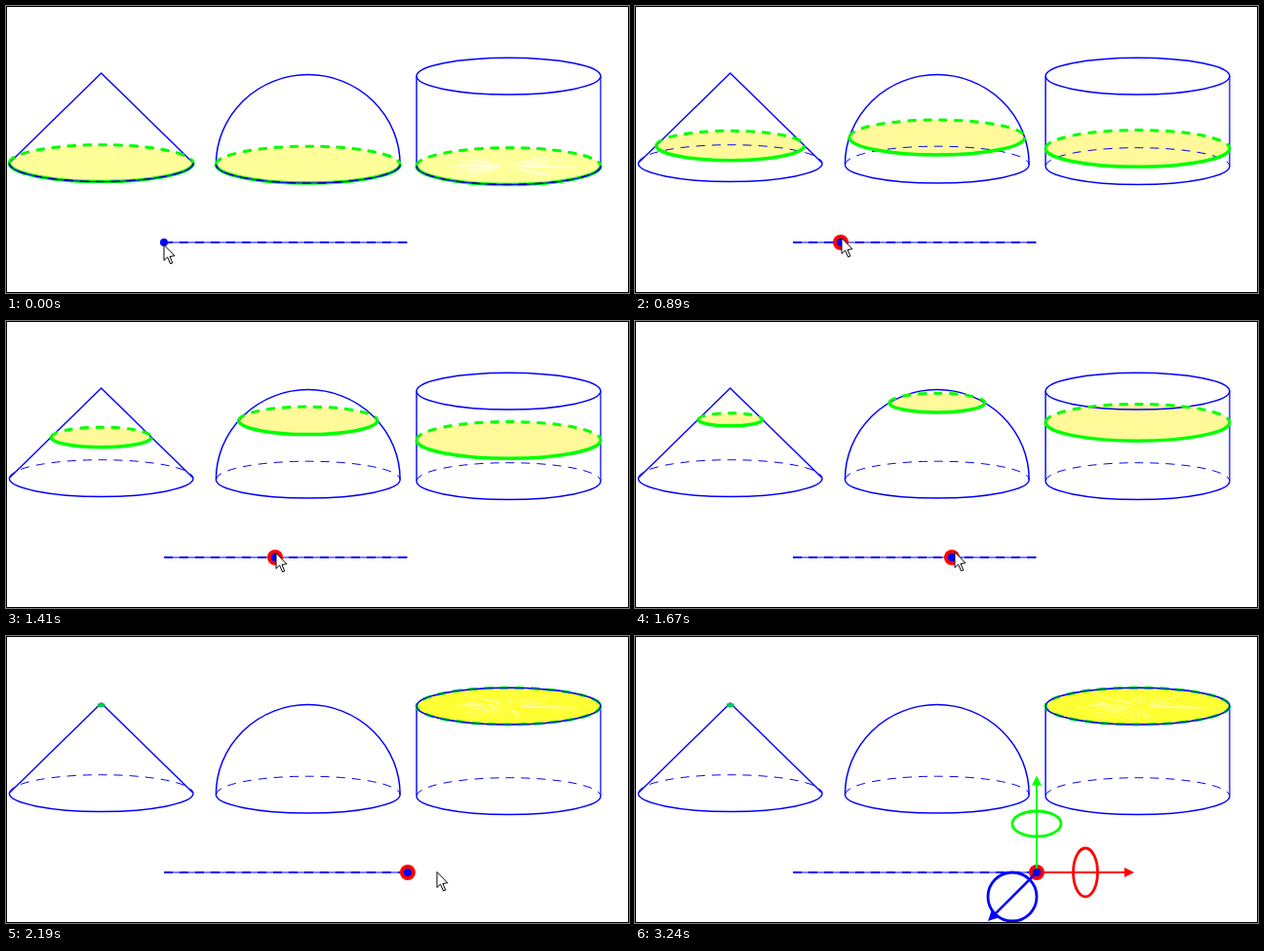
These frames come from a looping animation (639x295 px, 3500 ms). An HTML page with a canvas:

```html
<!DOCTYPE html>
<html lang="en">
<head>
<meta charset="utf-8">
<title>Sections of a cone, a hemisphere and a cylinder</title>
<style>
  html, body { margin: 0; width: 100%; height: 100%; overflow: hidden; background: #fff; }
  canvas { display: block; width: 639px; height: 295px; }
</style>
</head>
<body>
<canvas id="stage" width="639" height="295"></canvas>
<script>
const ctx = document.getElementById('stage').getContext('2d');
const LOOP = 3500, TAU = Math.PI * 2;
const BLUE = '#0000ff', GREEN = '#00ff00', RED = '#ff0000';
const RX = 94.4, RY = 18.9, HEIGHT = 92.5;
const TRACK = { from: 162, to: 412, y: 243 };
const CONE = { x: 97.7, y: 161.6 };
const DOME = { x: 309.8, y: 163.1 };
const DRUM = { x: 515.5, y: 164.6 };

// Each step: start time, knob x, pointer x and y
const STEPS = [
  [0, 162, 162, 245],
  [100, 162, 162, 244],
  [630, 174, 176, 239],
  [890, 211, 212, 238],
  [1150, 243, 244, 238],
  [1410, 276, 277, 238],
  [1670, 325, 328, 237],
  [1930, 386, 388, 238],
  [2190, 412, 442, 242],
  [2450, 412, 446, 243],
  [2710, 412, 512, 237],
  [3240, 412, null, null]
];

function stroke(color, width, dash = []) {
  ctx.strokeStyle = color;
  ctx.lineWidth = width;
  ctx.setLineDash(dash);
  ctx.stroke();
  ctx.setLineDash([]);
}

function line(points, color, width, dash) {
  ctx.beginPath();
  points.forEach(([x, y]) => ctx.lineTo(x, y));
  stroke(color, width, dash);
}

function oval(x, y, rx, ry, from = 0, to = TAU) {
  ctx.beginPath();
  ctx.ellipse(x, y, rx, ry, 0, from, to);
}

function disc(x, y, r, color) {
  oval(x, y, r, r);
  ctx.fillStyle = color;
  ctx.fill();
}

function base({ x, y }) {
  oval(x, y, RX, RY, Math.PI, TAU);
  stroke(BLUE, 1, [9, 7]);
  oval(x, y, RX, RY, 0, Math.PI);
  stroke(BLUE, 1.4);
}

function section(x, y, scale, color) {
  oval(x, y, RX * scale, RY * scale);
  ctx.fillStyle = color;
  ctx.fill();
}

function rim(x, y, scale, grounded) {
  const rx = RX * scale, ry = RY * scale;
  oval(x, y, rx, ry, Math.PI, TAU);
  stroke(GREEN, 3, [9, 7]);
  oval(x, y, rx, ry, 0, Math.PI);
  stroke(GREEN, 3.5);
  if (grounded) {
    stroke(BLUE, 1.2);
    stroke('#0000c0', 1.6, [9, 7]);
  }
}

// Pale rays where two coplanar discs overlap
function rays(x, y, color, spread) {
  let seed = 11;
  const random = () => (seed = seed * 16807 % 2147483647) / 2147483647;
  for (let i = 0; i < 34; i++) {
    const a = (i % 2) * Math.PI + (random() - 0.5) * spread;
    const near = 0.05 + random() * 0.25, far = near + 0.2 + random() * 0.45;
    const at = k => [x + RX * k * Math.cos(a), y + RY * k * Math.sin(a)];
    line([at(near), at(far)], color, 0.8);
  }
}

function solids(t) {
  const low = t === 0, top = t === 1;
  const angle = t * Math.PI / 2;
  const cuts = [
    [CONE.x, CONE.y - HEIGHT * t, 1 - t],
    [DOME.x, DOME.y - HEIGHT * Math.sin(angle), Math.cos(angle)],
    [DRUM.x, DRUM.y - HEIGHT * t, 1]
  ];
  const fill = low ? '#ffff99' : top ? '#ffff33' : '#fff999';
  if (top) cuts.splice(0, 2);
  cuts.forEach(([x, y, k]) => section(x, y, k, fill));
  if (low) rays(DRUM.x, DRUM.y, 'rgba(255,255,255,.6)', 1.9);
  if (top) rays(DRUM.x, DRUM.y - HEIGHT, 'rgba(255,255,190,.7)', 3.1);

  [CONE, DOME, DRUM].forEach(base);
  line([[CONE.x - RX, CONE.y], [CONE.x, CONE.y - HEIGHT], [CONE.x + RX, CONE.y]], BLUE, 1.4);
  oval(DOME.x, DOME.y, RX, HEIGHT, Math.PI, TAU);
  stroke(BLUE, 1.5);
  const left = DRUM.x - RX, right = DRUM.x + RX, lid = DRUM.y - HEIGHT;
  line([[left, lid], [left, DRUM.y]], BLUE, 1.4);
  line([[right, lid], [right, DRUM.y]], BLUE, 1.2);
  oval(DRUM.x, lid, RX, RY);
  stroke(BLUE, 1.4);

  if (top) {
    oval(DRUM.x, lid, RX, RY);
    stroke('#00e020', 3, [9, 7]);
    stroke(BLUE, 1.1);
    oval(CONE.x, CONE.y - HEIGHT + 2, 4, 2.4);
    ctx.fillStyle = '#00c850';
    ctx.fill();
  } else {
    cuts.forEach(([x, y, k]) => rim(x, y, k, low));
  }
}

function track() {
  const ends = [[TRACK.from, TRACK.y], [TRACK.to, TRACK.y]];
  line(ends, '#8080ff', 1.8);
  line(ends, BLUE, 1.8, [9, 7]);
}

function arrow(dx, dy, color, width) {
  const { to: x, y } = TRACK;
  const len = Math.hypot(dx, dy), ux = dx / len, uy = dy / len;
  const at = (along, side) => [x + ux * along - uy * side, y + uy * along + ux * side];
  line([at(0, 0), at(len - 7, 0)], color, width);
  ctx.beginPath();
  [[len, 0], [len - 10, 5], [len - 10, -5]].forEach(p => ctx.lineTo(...at(...p)));
  ctx.fillStyle = color;
  ctx.fill();
}

function gizmo(bold) {
  const ring = bold ? 6 : 2.8, shaft = bold ? 4.5 : 2;
  const { to: x, y } = TRACK;
  arrow(0, -99.5, GREEN, shaft);
  oval(x, y - 50, 25, 13);
  stroke(GREEN, ring);
  arrow(100, 0, RED, shaft);
  oval(x + 50, y, 12.5, 25);
  stroke(bold ? '#333333' : RED, ring);
  disc(x, y, 8, RED);
  line([[x, y], [x, y - 9]], GREEN, shaft);
  disc(x, y, 4, BLUE);
  oval(x - 25, y + 25, 25, 25);
  stroke(BLUE, ring);
  arrow(-50, 50, BLUE, bold ? 5 : 2.5);
}

function pointer(x, y) {
  const shape = [[0, 0], [0, 16], [3.6, 12.6], [6.6, 19.5], [8.8, 18.6], [6, 12], [11, 11.2]];
  ctx.beginPath();
  shape.forEach(([dx, dy]) => ctx.lineTo(x + dx, y + dy + 0.5));
  ctx.closePath();
  ctx.fillStyle = '#fff';
  ctx.fill();
  stroke('#000', 1);
}

function draw(now) {
  const time = now % LOOP;
  const [start, knob, px, py] = STEPS.filter(s => s[0] <= time).pop();
  ctx.fillStyle = '#fff';
  ctx.fillRect(0, 0, 639, 295);
  solids((knob - TRACK.from) / (TRACK.to - TRACK.from));
  track();
  if (start >= 2710) {
    gizmo(start < 3240);
  } else {
    if (start > 0) disc(knob, TRACK.y, 8, RED);
    disc(knob, TRACK.y, 4, BLUE);
  }
  if (px !== null) pointer(px, py);
  ctx.strokeStyle = '#000';
  ctx.lineWidth = 1;
  ctx.strokeRect(0.5, 0.5, 638, 294);
}

const began = performance.now();
function tick() {
  draw(performance.now() - began);
  requestAnimationFrame(tick);
}
tick();
</script>
</body>
</html>
```
